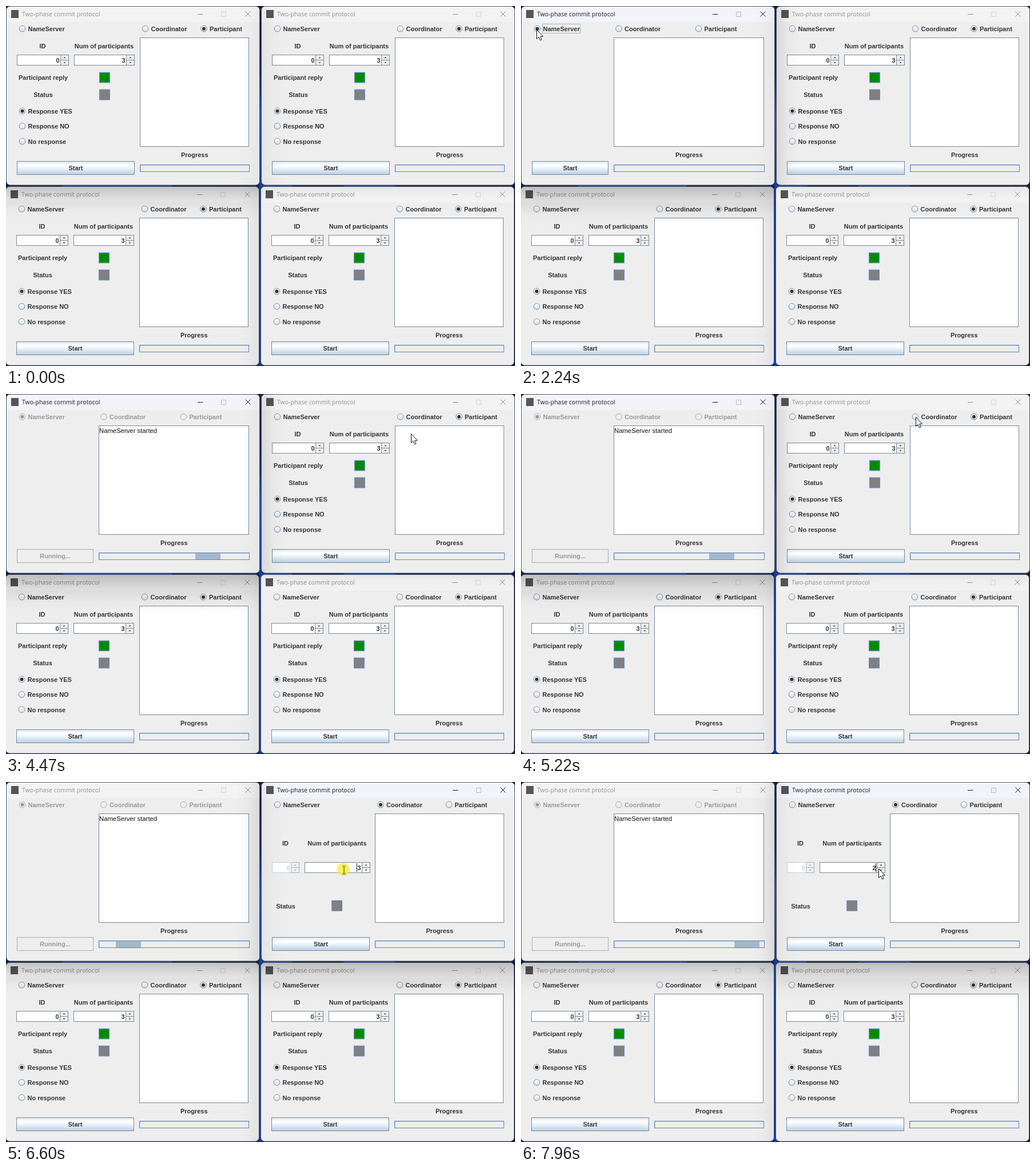
These frames come from a looping animation (890 px wide and 629 px high, 8 s). An HTML page:

```html
<!DOCTYPE html>
<html lang="en">
<head>
<meta charset="utf-8">
<title>Two-phase commit protocol</title>
<style>
html, body { margin: 0; width: 100%; height: 100%; overflow: hidden; background: #111d3e; }
svg { display: block; }
text { font: bold 11px "Liberation Sans", Arial, sans-serif; fill: #333; white-space: pre; }
text.title { font: 10.5px "Open Sans", "Noto Sans", sans-serif; }
text.log { font: 11.3px "Liberation Sans", Arial, sans-serif; fill: #111; }
rect { shape-rendering: crispEdges; }
rect.soft { shape-rendering: auto; }
</style>
</head>
<body>
<svg width="890" height="629" viewBox="0 0 890 629">
  <defs>
    <linearGradient id="btn" x2="0" y2="1">
      <stop stop-color="#dde8f3"/><stop offset=".3" stop-color="#fff"/>
      <stop offset=".45" stop-color="#f4f8fb"/><stop offset="1" stop-color="#b8cfe5"/>
    </linearGradient>
    <linearGradient id="knob" x2="0" y2="1">
      <stop stop-color="#fff"/><stop offset="1" stop-color="#cfdeed"/>
    </linearGradient>
    <linearGradient id="gap" x2="0" y2="1">
      <stop stop-color="#1a2136"/><stop offset=".18" stop-color="#16254f"/>
      <stop offset=".3" stop-color="#2450b8"/><stop offset=".5" stop-color="#153a9c"/>
      <stop offset="1" stop-color="#1136ae"/>
    </linearGradient>
    <linearGradient id="down" x2="0" y2="1">
      <stop stop-opacity=".22"/><stop offset=".35" stop-opacity=".09"/>
      <stop offset=".7" stop-opacity=".02"/><stop offset="1" stop-opacity="0"/>
    </linearGradient>
    <linearGradient id="right">
      <stop stop-opacity=".09"/><stop offset=".5" stop-opacity=".025"/><stop offset="1" stop-opacity="0"/>
    </linearGradient>
    <linearGradient id="left" x1="1" x2="0">
      <stop stop-opacity=".09"/><stop offset=".5" stop-opacity=".025"/><stop offset="1" stop-opacity="0"/>
    </linearGradient>
  </defs>
  <rect width="890" height="629" fill="#14203f"/>
  <rect x="442" width="6" height="629" fill="url(#gap)"/>
  <path d="M100 314.5H290M445 314.5H500M590 314.5H680" stroke="#2350b4" stroke-width="2"/>
  <g id="windows"></g>
  <rect id="bar" y="278" width="44" height="11" fill="#a3b8cc"/>
  <g id="pointer">
    <circle id="halo" r="11" fill="#f7ec3c" opacity=".8"/>
    <path id="arrow" d="M0 0V16L3.6 12.7 6 18.3 8.6 17.2 6.3 11.7H11Z" fill="#fff" stroke="#111" stroke-linejoin="round"/>
    <path id="beam" d="M-1.5-5.5H1M2-5.5H4.5M1.5-5V8M-1.5 8.5H1M2 8.5H4.5" fill="none" stroke="#333"/>
  </g>
</svg>
<script>
const $ = id => document.getElementById(id);
const EDGE = '#7a8a99', BLUE = '#6382bf', PALE = '#b8cfe5', FADED = '#999';

const box = (x, y, w, h, fill, stroke = EDGE) =>
  `<rect x="${x + .5}" y="${y + .5}" width="${w - 1}" height="${h - 1}" fill="${fill}" stroke="${stroke}"/>`;
const text = (x, y, s, fill = '#333', anchor = 'start', cls = '') =>
  `<text x="${x}" y="${y}" class="${cls}" style="fill:${fill}" text-anchor="${anchor}">${s}</text>`;
const mid = (x, y, s, fill) => text(x, y, s, fill, 'middle');
const line = (d, stroke) => `<path d="${d}" fill="none" stroke="${stroke}"/>`;
const shade = (x, y, w, h, dir, o = 1) =>
  `<rect x="${x}" y="${y}" width="${w}" height="${h}" fill="url(#${dir})" opacity="${o}"/>`;

function radio(x, y, label, on, off) {
  return `<circle cx="${x}" cy="${y}" r="5.3" fill="${off ? '#eee' : 'url(#knob)'}" stroke="${off ? '#aaa' : EDGE}"/>` +
    (on ? `<circle cx="${x}" cy="${y}" r="3" fill="${off ? FADED : '#333'}"/>` : '') +
    text(x + 10, y + 4.2, label, off ? FADED : '#333');
}

function spinner(x, y, w, value, off) {
  const a = x + w - 15, c = a + 7.5, ink = off ? '#aaa' : '#333', edge = off ? '#a9b4be' : EDGE;
  return box(x, y, w - 14, 19, '#fff', off ? PALE : EDGE) +
    box(a, y, 15, 10, '#eee', edge) + box(a, y + 9, 15, 10, '#eee', edge) +
    `<path d="M${c - 2} ${y + 6}h4l-2-2zM${c - 2} ${y + 13}h4l-2 2z" fill="${ink}"/>` +
    text(a - 1.5, y + 14, value, off ? '#b8d4e6' : '#333', 'end');
}

const lamp = (x, y, fill) =>
  `<rect class="soft" x="${x + .7}" y="${y + .7}" width="17.6" height="17.6" fill="${fill}" stroke="${BLUE}" stroke-width="1.2"/>`;

const gauge = x => box(x, 277, 426 - x, 13, '#eee', BLUE) + line(`M${x + 1.5} 289V278.5H425`, PALE);

// Horizontal measures of each role's form
const LAYOUT = {
  participant: { radios: [243.5, 346], area: 234, button: 206 },
  server: { radios: [171, 310.5], area: 162, button: 134 },
  coordinator: { radios: [209, 328.5], area: 199, button: 171 }
};

function form(mode, o) {
  if (mode === 'participant')
    return mid(64, 74, 'ID') + mid(171.5, 74, 'Num of participants') +
      spinner(19, 85, 91, 0) + spinner(119, 85, 106, 3) +
      text(22, 129, 'Participant reply') + lamp(163, 115.5, '#008c00') +
      mid(65, 159, 'Status') + lamp(163, 145.5, '#808080') +
      radio(28.5, 183.5, 'Response YES', true) +
      radio(28.5, 210, 'Response NO') + radio(28.5, 236.5, 'No response');
  if (mode === 'coordinator')
    return mid(42.5, 111, 'ID') + mid(133, 111, 'Num of participants') +
      spinner(19, 140, 48, 0, true) + spinner(76, 140, 115, o.value) +
      mid(43, 220.5, 'Status') + lamp(123.2, 206.7, '#808080');
  return '';
}

function frame(active) {
  const ink = active ? '#1b1b1b' : '#909090';
  return `<rect class="soft" x=".5" y=".5" width="443" height="312.5" rx="7" fill="#eee" stroke="#46526c"/>` +
    `<path d="M1 28V8Q1 1 8 1H436Q443 1 443 8V28Z" fill="${active ? '#f2f3fb' : '#f3f3f3'}"/>` +
    `<rect x="9" y="7" width="13" height="14" fill="#555"/>` +
    text(28, 18, 'Two-phase commit protocol', ink, 'start', 'title') +
    line('M335 14.5H344.5', ink) + line('M376.5 10.5h8v8h-8z', active ? '#bbb' : '#d4d4d4') +
    line('M418.5 9.5l9 9m0-9l-9 9', ink);
}

function pane(x, y, mode, o = {}) {
  const { radios, area, button } = LAYOUT[mode], run = o.running;
  const roles = [['NameServer', 'server', 28.5], ['Coordinator', 'coordinator', radios[0]],
    ['Participant', 'participant', radios[1]]];
  return `<g transform="translate(${x} ${y})">` + frame(o.active) +
    roles.map(([label, m, rx]) => radio(rx, 39.7, label, m === mode, run)).join('') +
    (o.focus ? box(o.focus[0], 31, o.focus[1], 17, 'none', '#a3b8cc') : '') +
    form(mode, o) +
    box(19, 271, button, 24, run ? '#eee' : 'url(#btn)', run ? '#aaa' : EDGE) +
    mid(19 + button / 2, 287.3, run ? 'Running...' : 'Start', run ? FADED : '#333') +
    box(area, 55, 425 - area, 191, '#fff') +
    (run ? text(area + 1, 67.5, 'NameServer started', '#111', 'start', 'log') : '') +
    mid((area + 425.5) / 2, 263.5, 'Progress') + gauge(area) +
    (o.caret ? line(`M${o.caret} 142V157`, '#222') : '') + '</g>';
}

const T = { focus1: 2040, server: 2180, run: 3290, focus2: 5290, coord: 5370, edit: 6540, blink: 7060, less: 7500 };
const CUTS = Object.values(T);

function windows(t) {
  const one = t >= T.focus1 && t < T.focus2, two = t >= T.focus2;
  const caret = t >= T.less ? 174.5 : t >= T.edit && t < T.blink ? 167.5 : 0;
  return pane(0, 0, t < T.server ? 'participant' : 'server', {
      active: one, running: t >= T.run, focus: t >= T.server && t < T.run && [37, 67] }) +
    pane(446, 0, t < T.coord ? 'participant' : 'coordinator', {
      active: two, value: t < T.less ? 3 : 2, caret, focus: t >= T.coord && t < T.edit && [218, 63] }) +
    pane(-1, 315, 'participant') + pane(445, 315, 'participant') +
    shade(0, 316, 443, one ? 70 : 58, 'down', one ? 1 : .9) +
    shade(446, 316, 444, two ? 70 : 30, 'down', two ? 1 : .25) +
    shade(447, 1, 41, 312, 'right', one ? 1 : .5) +
    shade(403, 1, 41, 312, 'left', two ? 1 : .4) +
    shade(403, 316, 40, 312, 'left', .6);
}

// time, x, y, upward bow of the path leading there
const PATH = [
  [250, 821, 618], [1010, 170, 50], [1100, 169, 50], [1640, 27.5, 42, 15], [1780, 27.5, 41],
  [2300, 27.5, 41], [2850, 95.5, 282], [3500, 95.5, 282], [3590, 103, 281], [4390, 703, 71],
  [4470, 708, 69.5], [4720, 715, 62], [5150, 690.5, 40.5], [6130, 690.5, 40.5],
  [6520, 589.5, 152.5], [7000, 589.5, 152.5], [7350, 625, 151], [8000, 625, 151]
];
const SLIDE = [[3300, 163], [4470, 331], [4836, 381], [5430, 300], [6396, 163], [6600, 192], [7905, 381], [8000, 367]];
const CLICKS = [[2040, 2180], [3150, 3290], [5290, 5400], [6540, 6690], [7430, 7560]];

function between(keys, t, ease) {
  let i = 1;
  while (i < keys.length - 1 && t > keys[i][0]) i++;
  const a = keys[i - 1], b = keys[i];
  const p = Math.min(1, Math.max(0, (t - a[0]) / (b[0] - a[0])));
  const k = ease(p);
  const at = n => a[n] + (b[n] - a[n]) * k;
  return [at(1), at(2) - (b[3] || 0) * Math.sin(Math.PI * k)];
}
const show = (id, on) => $(id).style.display = on ? '' : 'none';

let stage = -1;
function draw(t) {
  const now = CUTS.filter(c => t >= c).length;
  if (now !== stage) {
    stage = now;
    $('windows').innerHTML = windows(t);
  }
  show('bar', t >= T.run);
  $('bar').setAttribute('x', Math.round(between(SLIDE, t, p => p)[0]));

  const [x, y] = between(PATH, t, p => p * p * (3 - 2 * p));
  const inField = t >= T.coord && x > 522 && x < 621 && y > 141 && y < 158;
  show('pointer', t >= 250);
  show('halo', CLICKS.some(([a, b]) => t >= a && t < b));
  show('beam', inField);
  show('arrow', !inField);
  $('pointer').setAttribute('transform', `translate(${Math.floor(x) + .5} ${Math.floor(y) + .5})`);
}

function tick() {
  draw(performance.now() % 8000);
  requestAnimationFrame(tick);
}
tick();
</script>
</body>
</html>
```
